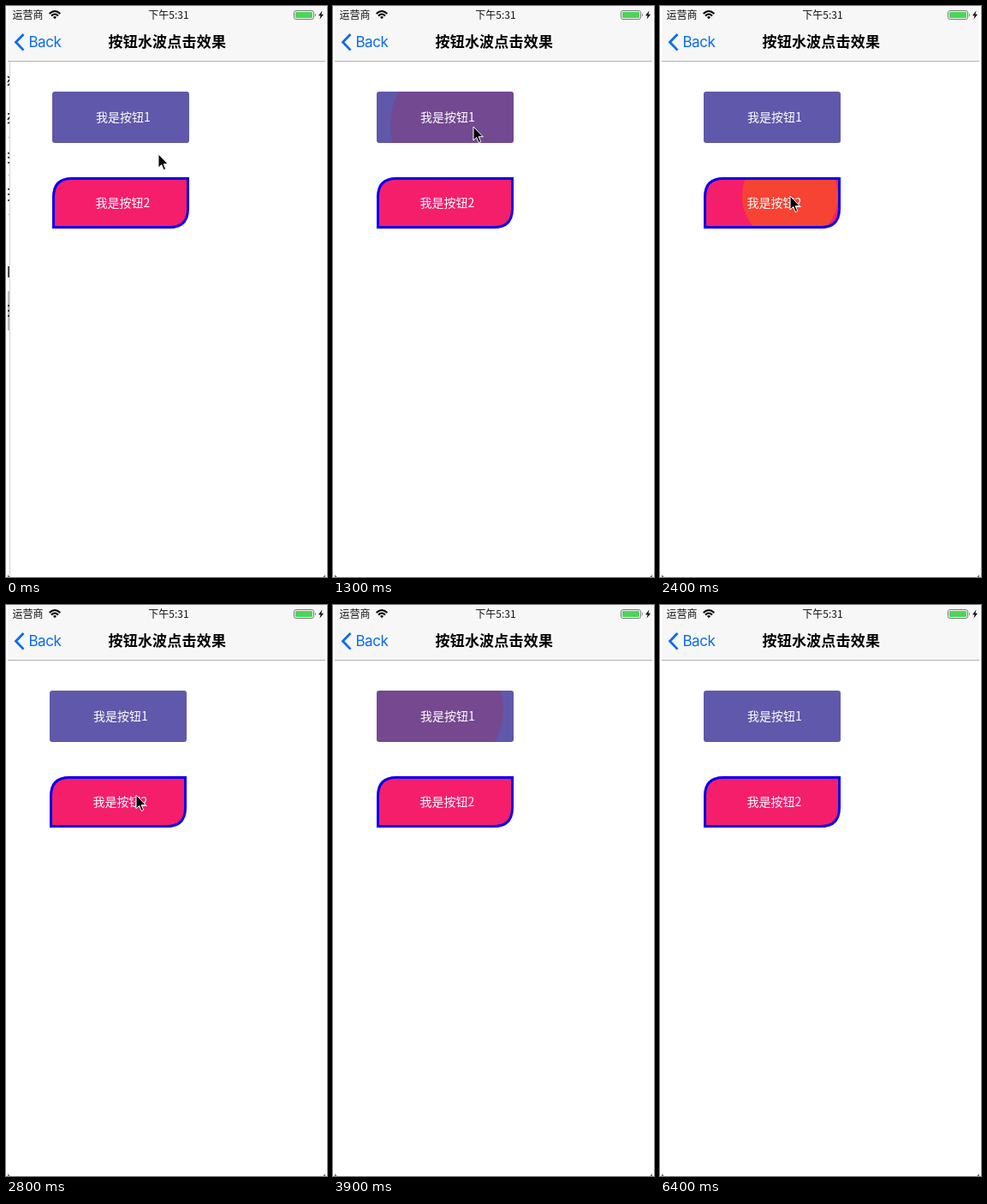
An HTML page for the animation above (6.5 s loop, 375 by 667 pixels).

```html
<!DOCTYPE html>
<html lang="zh">
<head>
<meta charset="utf-8">
<style>
  html, body { margin: 0; width: 100%; height: 100%; overflow: hidden; background: #fff; }
  svg { display: block; width: 375px; height: 667px; }
  text { font-family: "Noto Sans CJK SC", "Noto Sans CJK", sans-serif; font-size: 14px; fill: #fff; }
  .status { font-size: 12px; fill: #111; }
  .clock { font-weight: 500; text-anchor: middle; }
  .title { font-size: 17px; font-weight: 700; letter-spacing: .2px; fill: #000; text-anchor: middle; }
  .back { font-family: Inter, sans-serif; font-size: 17px; letter-spacing: -.5px; fill: #0a6cf0; }
</style>
</head>
<body>
<svg viewBox="0 0 375 667">
  <defs>
    <rect id="shape1" x="51" y="100" width="160" height="60" rx="3"/>
    <path id="shape2" d="M52.5 258.5V223C52.5 208 60 201.5 74 201.5H209.5V237C209.5 252 202 258.5 188 258.5Z"/>
    <clipPath id="clip1"><use href="#shape1"/></clipPath>
    <clipPath id="clip2"><use href="#shape2"/></clipPath>
  </defs>

  <!-- Edge of the page being left behind -->
  <g id="oldPage">
    <path d="M2 153.5h3M2 197.5h3M2 243.5h3" stroke="#ccc"/>
    <path d="M2 333h3v46h-3z" fill="#bbb"/>
    <path d="M2 82l2 2M2 89l2-3M2 93l2-2M2 126h2M2 133l2-3M2 137l2-1M2 172h2M2 177h2M2 183h2M2 214h2M2 220h2M2 227h2M3 304v13M2 350h2M2 356h2M2 362h2" stroke="#111" stroke-width="1.5"/>
  </g>

  <g id="page">
    <rect x="2" y="64" width="373" height="603" fill="#fff"/>
    <path id="pageEdge" d="M1.5 65V667" stroke="#d2d2d2"/>
    <use href="#shape1" fill="#6058aa"/>
    <g clip-path="url(#clip1)"><circle id="wave1" fill="#d0021b"/></g>
    <text x="102" y="135.3">我是按钮1</text>
    <use href="#shape2" fill="#f51e6b"/>
    <g clip-path="url(#clip2)"><circle id="wave2" fill="#f85f0c"/></g>
    <use href="#shape2" fill="none" stroke="#0b00ea" stroke-width="3"/>
    <text x="101.5" y="235.3">我是按钮2</text>
  </g>

  <path d="M2 0H373V64H2Z" fill="#f7f7f7"/>
  <path d="M2 64.5H373" stroke="#b2b2b2"/>
  <path d="M2 664v3h3q-2-1-3-3M373 664v3h-3q2-1 3-3" fill="#666"/>

  <text class="status" x="7.5" y="15">运营商</text>
  <g fill="none" stroke="#000" stroke-width="2.1">
    <path d="M50.7 9Q57 3 63.3 9M53 11.4Q57 7.6 61 11.4"/>
    <path d="M55 12.9Q57 11.3 59 12.9L57 15.3Z" fill="#000" stroke="none"/>
  </g>
  <text class="status clock" x="190" y="15">下午5:31</text>
  <rect x="336.5" y="5.5" width="23" height="10" rx="2.3" fill="none" stroke="#777"/>
  <rect x="338" y="7" width="20" height="7" rx="1" fill="#4cd558"/>
  <path d="M361 8.5q2 2 0 4z" fill="#777"/>
  <path d="M369.5 5.5L365 11.2h2.6L366.5 15.500L371 9.700h-2.700z" fill="#000"/>

  <path d="M20.500 33L11.500 42.300L20.500 51.600" fill="none" stroke="#0a6cf0" stroke-width="2.800"/>
  <text class="back" x="26.500" y="48.300">Back</text>
  <text class="title" x="188.300" y="48.400">按钮水波点击效果</text>

  <path id="cursor" d="M0 0V16L3.700 12.500L6.200 18.500L8.700 17.500L6.200 11.700H11.300Z" stroke="#fff" stroke-width="1"/>
</svg>
<script>
const LOOP = 6500, STEP = 100, WAVE_MS = 690, CURSOR_HIDE = 3600;
const el = id => document.getElementById(id);
const clamp = v => Math.max(0, Math.min(1, v));

// Each tap: button, start time, position and radius at the farthest corner.
const taps = [
  { button: 1, start: 743, x: 164, y: 141, reach: 120 },
  { button: 2, start: 2042, x: 152, y: 222, reach: 108 },
  { button: 1, start: 3348, x: 120, y: 122, reach: 98.6 }
];

// Cursor moves between taps: [from, to, x0, y0, x1, y1]
const moves = [
  [100, 650, 178, 173, 164, 141],
  [1450, 1950, 164, 141, 152, 222],
  [2800, 3300, 152, 222, 120, 122]
];

function cursorAt(t) {
  const [from, to, x0, y0, x1, y1] = moves.filter(m => t >= m[0]).pop() || moves[0];
  const k = clamp((t - from) / (to - from));
  const e = k * k * (3 - 2 * k);
  return [x0 + (x1 - x0) * e, y0 + (y1 - y0) * e];
}

function drawWave(button, t) {
  const wave = el("wave" + button);
  const tap = taps.find(w => w.button === button && t >= w.start && t < w.start + WAVE_MS);
  wave.setAttribute("r", 0);
  if (!tap) return;
  const p = (t - tap.start) / WAVE_MS;
  wave.setAttribute("cx", tap.x);
  wave.setAttribute("cy", tap.y);
  wave.setAttribute("r", tap.reach * p);
  wave.setAttribute("opacity", clamp((0.93 - p) / 0.72));
}

function draw(now) {
  const t = Math.floor((now % LOOP) / STEP) * STEP;
  const slide = Math.round(3.2 * Math.exp(-t / 90));
  el("page").setAttribute("transform", `translate(${slide})`);
  el("oldPage").style.display = el("pageEdge").style.display = slide ? "" : "none";
  drawWave(1, t);
  drawWave(2, t);
  el("cursor").setAttribute("transform", `translate(${cursorAt(t)})`);
  el("cursor").style.display = t < CURSOR_HIDE ? "" : "none";
}

const begin = performance.now();
function tick() {
  draw(performance.now() - begin);
  requestAnimationFrame(tick);
}
tick();
</script>
</body>
</html>
```
